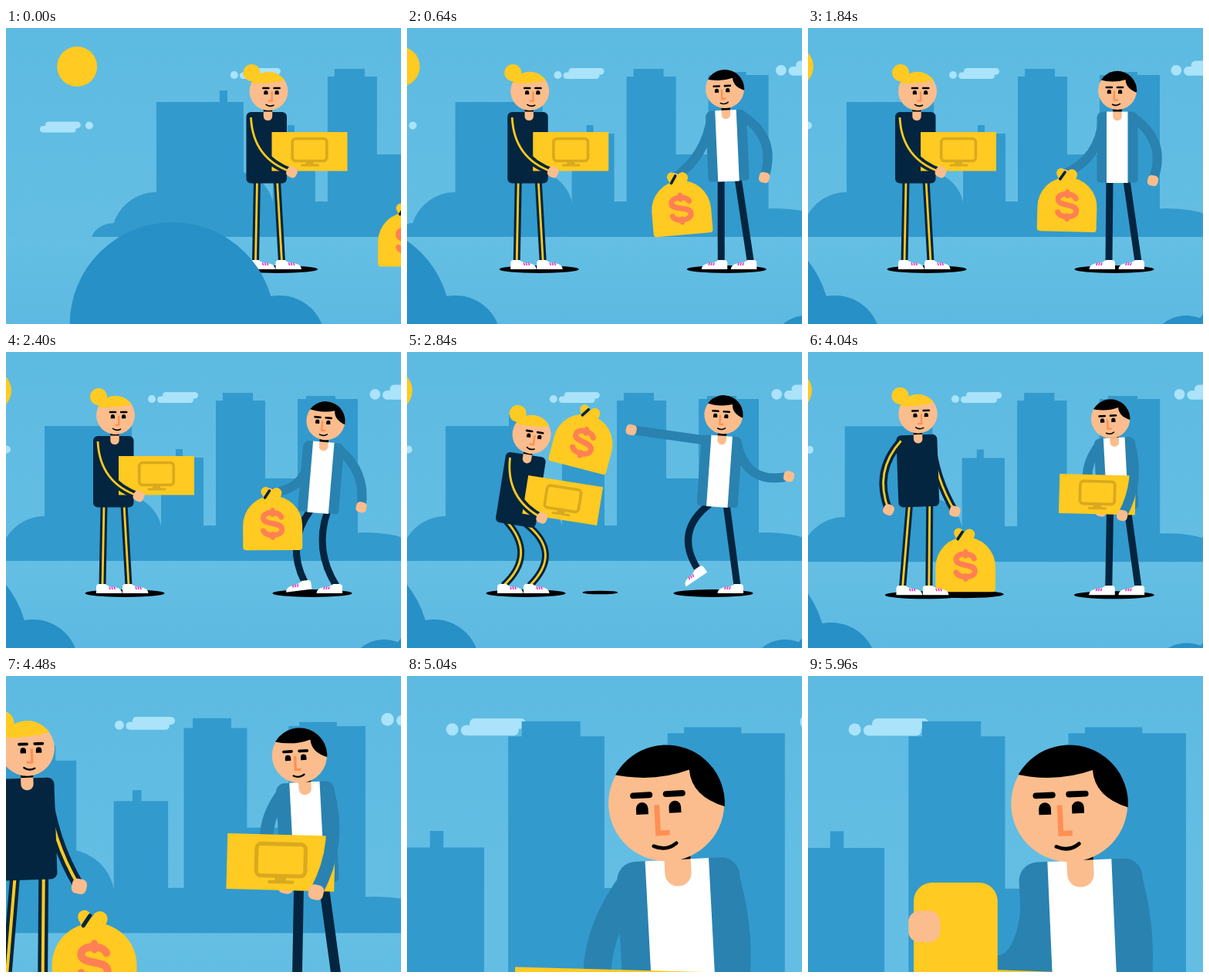
Animation of 512 by 384 pixels, one loop 6000 ms. Source, as an HTML page with a canvas:

```html
<!DOCTYPE html>
<html lang="en">
<head>
<meta charset="utf-8">
<title>The swap</title>
<style>
  html, body { margin: 0; width: 100%; height: 100%; overflow: hidden; background: #61bce2; }
  canvas { display: block; width: 512px; height: 384px; }
</style>
</head>
<body>
<canvas id="stage" width="512" height="384"></canvas>
<script>
const ctx = document.getElementById('stage').getContext('2d');
const LOOP = 6000, RAD = Math.PI / 180;
const GOLD = '#ffca21', NAVY = '#03253f', SKIN = '#fbbd8d', JACKET = '#2a82b0',
      TOWN = '#339acd', HILL = '#2790c6', CLOUD = '#aae3fa', ORANGE = '#ff8052', INK = '#000';

// Moments when things leave or reach a hand
const BAG_OFF = 2500, BAG_HIT = 2740, BAG_DOWN = 3110, BOX_OFF = 3280, BOX_ON = 3550, PEEK = 5160;

// Hands are [x, y, elbow side], measured from the hip in the leaning body
const pose = (x, y, lean, left, right, nod = 0, kick = 0) => ({ body: [x, y, lean], left, right, extra: [nod, kick] });
const GRIP = [33, -14, 1], UNDER = [50, -40, 1], HANG = [46, -3, -1], CLASP = [5, 8, -1];

const woman = {
  carry: pose(139, 201, 0, GRIP, UNDER),
  brace: pose(140, 224, 9, GRIP, UNDER),
  wind: pose(137, 216, 7, GRIP, UNDER),
  toss: pose(148, 200, -8, [69, -70, 1], [80, -48, 1]),
  rest: pose(146, 199, -2, [-39, 3, 1], [46, 8, 1]),
  script: '0 carry 2700 carry 2820 brace 2880 brace 3060 carry 3220 wind 3380 toss 3480 toss 3900 rest'
};
const man = {
  reach: pose(404, 214, -24, [-89, -16, -1], [25, 0, -1]),
  lift: pose(400, 199, -2.5, [-71, -7, -1], HANG),
  stand: pose(401, 201, 0, [-70, -11, -1], HANG),
  wind: pose(405, 211, 5, [-53, -1, -1], HANG),
  hurl: pose(402, 201, 4, [-118, -92, -1], [90, -46, 1], 0, 1),
  crouch: pose(401, 222, -4, [-65, -36, -1], [37, -22, -1], 1),
  hold: pose(402, 203, -3, [-22, 1, 1], CLASP, 1),
  peek: pose(402, 203, -2.5, [-68, -67, -1], CLASP, 1),
  script: '0 reach 60 reach 640 lift 1240 stand 2080 stand 2300 wind 2640 hurl 2880 hurl 3120 stand'
    + ' 3360 crouch 3550 crouch 3900 hold 5160 hold 5700 peek'
};

const clamp = v => Math.max(0, Math.min(1, v));
const span = (t, from, to) => clamp((t - from) / (to - from));
const ease = p => p * p * (3 - 2 * p);
const mix = (a, b, p) => a.map((v, i) => v + (b[i] - v) * p);

function perform(actor, t) {
  const cues = actor.script.split(' ');
  let i = 0;
  while (i + 2 < cues.length && +cues[i + 2] <= t) i += 2;
  const a = actor[cues[i + 1]], b = actor[cues[i + 3]];
  if (!b) return a;
  const p = ease(span(t, +cues[i], +cues[i + 2])), out = {};
  for (const part in a) out[part] = mix(a[part], b[part], p);
  return out;
}

// Point in the frame of a leaning body
function joint([x, y, lean], dx, dy) {
  const c = Math.cos(lean * RAD), s = Math.sin(lean * RAD);
  return [x + dx * c - dy * s, y + dx * s + dy * c];
}

// Thrown path between two [x, y, turn] states
function hop(p, a, b, height, spin = 0) {
  const [x, y, turn] = mix(a, b, p), arc = 4 * p * (1 - p);
  return [x, y - height * arc, turn - spin * arc];
}

function heldBag(t) {
  const m = perform(man, t), since = Math.max(0, t - 640);
  const swing = -5 * ease(span(t, 0, 640)) * Math.cos(since / 127) * Math.exp(-since / 1000);
  return [...joint(m.body, ...m.left.slice(0, 2)), swing];
}
function bagAt(t) {
  const hit = [245, 92, 20], ground = [200, 235, 0];
  if (t < BAG_OFF) return heldBag(t);
  if (t < BAG_HIT) return hop(span(t, BAG_OFF, BAG_HIT), heldBag(BAG_OFF), hit, 40);
  if (t < BAG_DOWN) return hop(span(t, BAG_HIT, BAG_DOWN), hit, ground, 68);
  return hop(span(t, BAG_DOWN, BAG_DOWN + 120), ground, ground, 6);
}

function boxAt(t) {
  const hers = time => { const { body } = perform(woman, time); return [...joint(body, 56, -41), body[2]]; };
  const his = time => { const { body } = perform(man, time); return [...joint(body, -25.5, -21), body[2] + 4.5]; };
  if (t < BOX_OFF) return hers(t);
  if (t > BOX_ON) return his(t);
  return hop(span(t, BOX_OFF, BOX_ON), hers(BOX_OFF), his(BOX_ON), 78, 6);
}

function at(x, y, turn, draw) {
  ctx.save();
  ctx.translate(x, y);
  ctx.rotate(turn * RAD);
  draw();
  ctx.restore();
}
function fill(color, trace) {
  ctx.fillStyle = color;
  ctx.beginPath();
  trace();
  ctx.fill();
}
function stroke(color, width, trace, cap = 'round') {
  ctx.strokeStyle = color;
  ctx.lineWidth = width;
  ctx.lineCap = cap;
  ctx.beginPath();
  trace();
  ctx.stroke();
}
const rect = (color, x, y, w, h, r = 0) => fill(color, () => ctx.roundRect(x, y, w, h, r));
const oval = (color, x, y, rx, ry = rx) => fill(color, () => ctx.ellipse(x, y, rx, ry, 0, 0, 7));
const line = (color, w, x1, y1, x2, y2, cap) =>
  stroke(color, w, () => { ctx.moveTo(x1, y1); ctx.lineTo(x2, y2); }, cap);

// Limb of fixed length: the closer its ends, the more it bows
function limb(a, b, length, side, width, color, stripe, cap) {
  const dx = b[0] - a[0], dy = b[1] - a[1], d = Math.hypot(dx, dy);
  const bow = 2 * side * .36 * Math.sqrt(Math.max(0, length ** 2 - d ** 2)) / d;
  const trace = () => {
    ctx.moveTo(...a);
    ctx.quadraticCurveTo((a[0] + b[0]) / 2 - dy * bow, (a[1] + b[1]) / 2 + dx * bow, ...b);
  };
  stroke(color, width, trace, cap);
  if (stripe) stroke(GOLD, 2.8, trace, 'butt');
}
const arm = (body, shoulder, [x, y, side], color, stripe) =>
  limb(joint(body, shoulder, -85), joint(body, x, y), 98, side, stripe ? 10 : 12, color, stripe);
const hand = (body, [x, y], turn = 12) =>
  at(...joint(body, x, y), turn, () => rect(SKIN, -6.8, -6.8, 13.6, 13.6, 4.8));

function leg(body, hip, foot, dir, stripe) {
  limb(joint(body, hip, -3), foot.slice(0, 2), 102, -dir, 9, NAVY, stripe, 'butt');
  at(...foot, () => {
    ctx.scale(dir, 1);
    fill('#fff', () => {
      ctx.moveTo(-8, 10);
      ctx.lineTo(-8, 2);
      ctx.quadraticCurveTo(-8, -2, -4, -2);
      ctx.lineTo(4, -2);
      ctx.quadraticCurveTo(8, 2, 15, 2);
      ctx.quadraticCurveTo(25, 3, 25.5, 10);
    });
    for (let x = 9; x < 17; x += 3) line('#f032b4', 1.6, x, 1.5, x + 1.2, 5, 'butt');
  });
}

function face() {
  for (const x of [-10.6, 3.6]) {
    line(INK, 2.6, x - 3.6, -4, x + 3.5, -4);
    fill(INK, () => {
      ctx.arc(x, 1.7, 2.6, Math.PI, 0);
      ctx.lineTo(x + 2.6, 4.3);
      ctx.lineTo(x - 2.6, 4.3);
    });
  }
  stroke('#ff8f55', 2.3, () => { ctx.moveTo(-4.2, .5); ctx.lineTo(-4.2, 12.7); ctx.lineTo(.8, 12.7); }, 'butt');
  stroke(INK, 1.6, () => { ctx.moveTo(-6.4, 18.2); ctx.quadraticCurveTo(-1, 20.8, 3.4, 17.4); });
}
function neck(x) {
  rect(SKIN, x - 5.7, -94, 11.4, 13, [0, 0, 5.5, 5.5]);
  rect(INK, x - 5.7, -98, 11.4, 5.5);
}
// A disc with hair cut to its outline
function head(hair, hairline, dir) {
  oval(SKIN, 0, 0, 25);
  ctx.save();
  ctx.beginPath();
  ctx.arc(0, 0, 25.2, 0, 7);
  ctx.clip();
  fill(hair, () => { hairline(); ctx.lineTo(30, -30); ctx.lineTo(-30, -30); });
  ctx.restore();
  ctx.scale(dir, 1);
  face();
}

function drawBox(t) {
  const box = boxAt(t);
  at(...box, () => {
    rect(GOLD, -49, -25, 98, 50.5);
    stroke('#d9a91f', 3.6, () => ctx.roundRect(-22.3, -16.5, 44.6, 29, 4.5));
    rect('#d9a91f', -5, 13, 10, 5);
    line('#d9a91f', 3, -10, 18, 11, 18);
  });
}

function drawBag(t) {
  at(...bagAt(t), () => {
    ctx.translate(6, 74);
    line(GOLD, 12, -9, -76, -4, -66);
    line(GOLD, 14, 5, -74, 0, -64);
    rect(GOLD, -38.5, -70.5, 77, 70.5, [38.5, 38.5, 4, 4]);
    line(NAVY, 3.6, -10, -68, -4, -77);
    ctx.translate(0, -34);
    stroke(ORANGE, 7, () => {
      ctx.moveTo(11, -9);
      ctx.bezierCurveTo(8, -17, -13, -17, -12, -7);
      ctx.bezierCurveTo(-11, 2, 12, -3, 12, 7);
      ctx.bezierCurveTo(12, 17, -9, 17, -12, 9);
    });
    line(ORANGE, 6, 0, -18, 0, -12);
    line(ORANGE, 6, 0, 13, 0, 18);
  });
}

function drawMan(t) {
  const { body, left, right, extra: [nod, kick] } = perform(man, t);
  leg(body, -10, mix([390, 303, 0], [377, 282, -34], kick), -1);
  leg(body, 12, [428, 303, 0], -1);
  arm(body, -19, left, JACKET);
  at(...body, () => {
    rect(JACKET, -26.5, -92.5, 53, 92, [8, 8, 4, 4]);
    rect('#fff', -14, -92.5, 27.5, 92.5);
    neck(0);
    ctx.translate(-3.5 * nod, 3 * nod - 120);
    head(INK, () => {
      ctx.moveTo(-27, -15);
      ctx.quadraticCurveTo(-7, -8.5, 10.6, -14);
      ctx.quadraticCurveTo(11, -2, 26, 3);
    }, 1);
  });
  if (t > PEEK) {
    const [x, y] = boxAt(t);
    rect(GOLD, x - 49, y - 20 - 43 * ease(span(t, PEEK, 5700)), 36, 60, 8);
  }
  hand(body, left, t > PEEK ? 0 : 12);
  if (t >= 3480) drawBox(t);
  arm(body, 20, right, JACKET);
  hand(body, right);
}

function drawWoman(t) {
  const { body, left, right } = perform(woman, t);
  arm(body, 19, right, NAVY, true);
  hand(body, right);
  leg(body, -12, [125, 303, 0], 1, true);
  leg(body, 14, [159, 303, 0], 1, true);
  at(...body, () => {
    rect(NAVY, -26, -92, 52.5, 92.5, 6);
    neck(2);
    ctx.translate(3, -119);
    oval(GOLD, -22, -24, 11);
    head(GOLD, () => {
      ctx.moveTo(-27, -11);
      ctx.quadraticCurveTo(-4, -8, 26, -15);
    }, -1);
  });
  if (t < 3480) drawBox(t);
  arm(body, -20, left, NAVY, true);
  hand(body, left, 25);
}

function cloud(x, y, size, dotX, dotY) {
  ctx.save();
  ctx.translate(x, y);
  ctx.scale(size, size);
  rect(CLOUD, 0, 0, 47, 8.5, 4.2);
  rect(CLOUD, 7, -5.5, 46, 8.5, 4.2);
  oval(CLOUD, dotX, dotY, 5);
  ctx.restore();
}

function drawSky(t) {
  const drift = (t - 1840) * .0018;
  oval(GOLD, -19, 50, 26);
  cloud(-64 + drift, 127, 1, 64, -.5);
  cloud(195 + drift, 57.5, 1, -7, 3.5);
  cloud(487 + drift, 50, 1.38, -7, 3.5);
}

function tower(x, top, width, capX, capWidth, capHeight) {
  rect(TOWN, x, top, width, 272 - top);
  rect(TOWN, x + capX, top - capHeight, capWidth, capHeight + 1);
}
function drawTown() {
  const land = ctx.createLinearGradient(0, 271, 0, 384);
  land.addColorStop(0, '#65bfe4');
  land.addColorStop(1, '#5db9e1');
  oval(TOWN, 50, 271, 58);
  oval(TOWN, -4, 275, 30, 22);
  oval(TOWN, 152, 236, 50);
  oval(TOWN, 264, 271, 75, 46);
  oval(TOWN, 465, 271, 85, 37);
  tower(50, 96, 113, 82, 10, 15);
  tower(201, 137, 55, 19, 9, 11);
  tower(272, 63, 64, 9, 39, 10);
  tower(378, 61, 78, 11, 38, 4);
  rect(TOWN, 335, 164, 44, 107);
  rect(TOWN, 60, 235, 380, 37);
  rect(land, -600, 271, 1700, 500);
}

function drawHills() {
  oval(HILL, -104, 385, 133);
  oval(HILL, 35, 406, 59);
  oval(HILL, 490, 420, 47);
  oval(HILL, 540, 400, 40);
}

function drawCast(t) {
  oval(INK, 154, 313, 51.5, 5);
  oval(INK, 397, 313, 51.5, 5);
  if (t > BAG_OFF) {
    const [x, y] = bagAt(t), height = 235 - y;
    const r = (50 - height * .171) * span(t, BAG_OFF, BAG_HIT);
    oval(INK, x + 5 + height * .08, 312, r, r * .1);
  }
  drawMan(t);
  drawBag(t);
  drawWoman(t);
}

function camera(t) {
  const pan = (1 - clamp(t / 1150)) ** 3, p = span(t, 3850, 5160);
  const push = p < .5 ? 4 * p ** 3 : 1 - 4 * (1 - p) ** 3;
  return { x: 110 * push - 199 * pan, y: -97 * push, z: .669 * push };
}
// Nearness 1 is the cast; smaller values lie further back
function layer(cam, near, draw) {
  const gap = 1 - near * cam.z;
  if (gap < .25) return;
  const s = 1 / gap;
  ctx.setTransform(s, 0, 0, s, 256 - (256 + near * cam.x) * s, 192 - (192 + near * cam.y) * s);
  draw();
}

function render(t) {
  const cam = camera(t);
  ctx.setTransform(1, 0, 0, 1, 0, 0);
  const air = ctx.createLinearGradient(0, 0, 0, 271);
  air.addColorStop(0, '#5dbae1');
  air.addColorStop(1, '#64bee4');
  rect(air, 0, 0, 512, 384);
  layer(cam, .56, () => drawSky(t));
  layer(cam, .73, drawTown);
  layer(cam, 1, () => drawCast(t));
  layer(cam, 1.61, drawHills);
}

const start = performance.now();
function tick() {
  render((performance.now() - start) % LOOP);
  requestAnimationFrame(tick);
}
tick();
</script>
</body>
</html>
```
